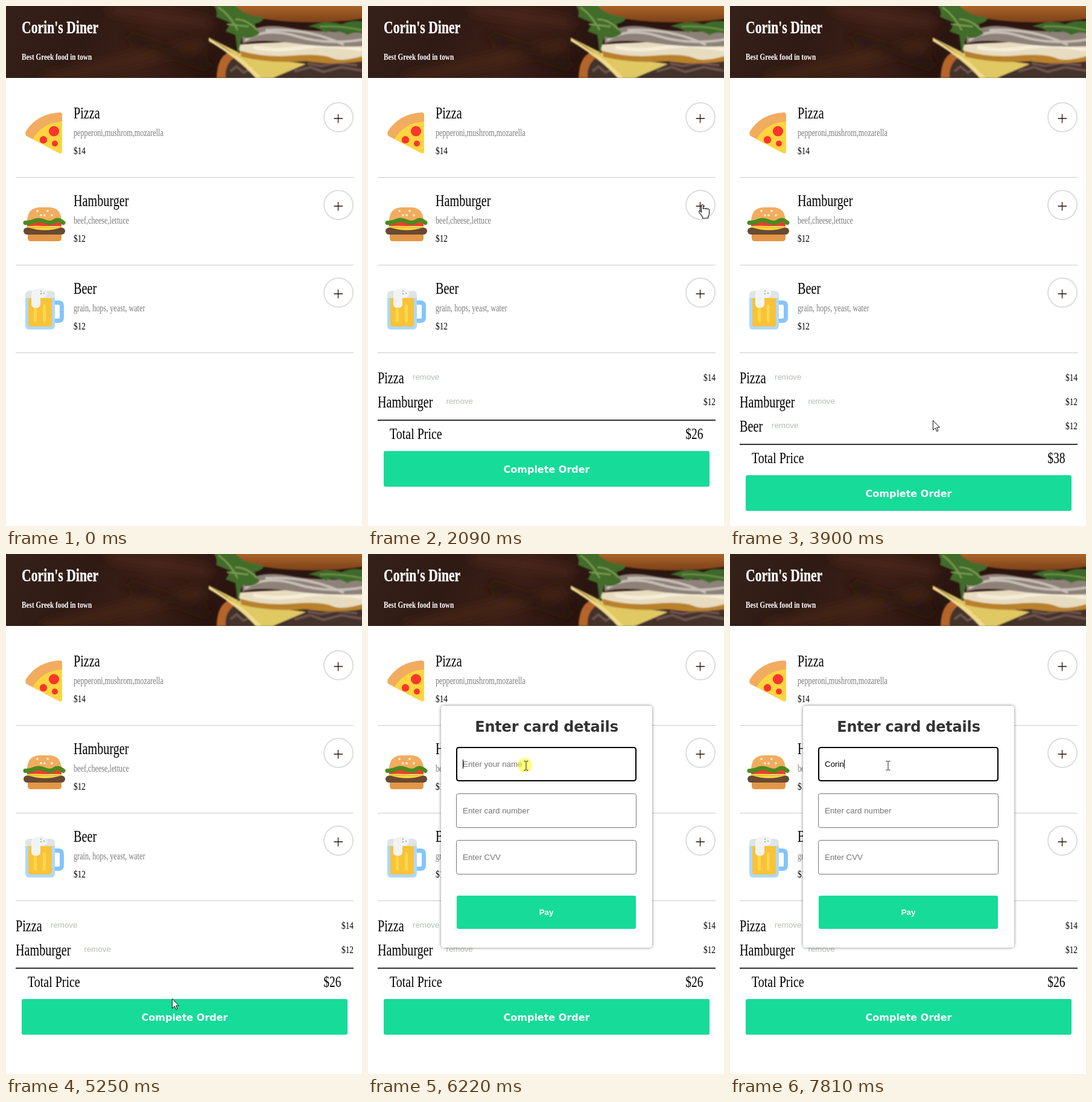
Recreate the animation shown at these times as an HTML page. Size 590 by 860 pixels, loop 8 s.

```html
<!DOCTYPE html>
<html lang="en">
<head>
<meta charset="utf-8">
<title>Diner menu</title>
<style>
html, body { margin: 0; width: 100%; height: 100%; overflow: hidden; background: #fff; }
svg { display: block; width: 590px; height: 860px; }
.menu { font-family: "Liberation Serif", "Noto Serif", serif; }
.ui { font: 13.333px "Liberation Sans", Arial, sans-serif; }
.bold { font: bold 16px "DejaVu Sans", Verdana, sans-serif; }
</style>
</head>
<body>
<svg viewBox="0 0 590 860" xmlns="http://www.w3.org/2000/svg">
  <defs>
    <clipPath id="banner"><rect width="590" height="119"/></clipPath>
    <linearGradient id="wood" x2="1" y2=".1">
      <stop offset="0" stop-color="#35211a"/><stop offset=".25" stop-color="#2f1a14"/>
      <stop offset=".45" stop-color="#3d2017"/><stop offset=".65" stop-color="#2a1510"/>
    </linearGradient>
    <linearGradient id="bun" x2="0" y2="1">
      <stop offset="0" stop-color="#b06a2c"/><stop offset="1" stop-color="#7b4019"/>
    </linearGradient>
    <filter id="soft"><feGaussianBlur stdDeviation=".8"/></filter>
    <filter id="blur" x="-20%" y="-50%" width="140%" height="200%"><feGaussianBlur stdDeviation="9"/></filter>
    <filter id="shadow" x="-10%" y="-10%" width="120%" height="120%">
      <feDropShadow dx="0" dy="0" stdDeviation="2.6" flood-color="#000" flood-opacity=".5"/>
    </filter>
  </defs>

  <g clip-path="url(#banner)">
    <rect width="590" height="119" fill="url(#wood)"/>
    <g filter="url(#blur)" fill="none" stroke-width="14">
      <path d="M60 122L330 62" stroke="#492618"/>
      <path d="M170 4L340 30" stroke="#4d281b"/>
      <path d="M200 50L340 100" stroke="#26120d"/>
    </g>
    <g filter="url(#soft)">
      <path d="M349 119Q350 84 370 76L420 119Z" fill="#b5652a"/>
      <path d="M364 119Q362 96 380 84Q480 74 600 84V122H364Z" fill="#43302c"/>
      <path d="M372 108l10-8 12 10 12-6M478 108l26-7 22 8 30-8 34 6M500 95l22 4 26-5 34 4" fill="none" stroke="#6d534c" stroke-width="4"/>
      <path d="M336 52Q356 62 396 82L497 96L442 119H416Q394 86 336 52Z" fill="#e0c864"/>
      <path d="M336 52Q372 76 396 92L424 119H414Q384 86 336 58Z" fill="#f0dc8c"/>
      <path d="M384 64Q470 56 600 62V88Q540 97 498 88Q452 96 390 84Z" fill="#e8dcc0"/>
      <path d="M388 74Q430 86 476 82T540 86T600 80V90Q540 99 498 91Q440 96 390 84Z" fill="#b9812c"/>
      <path d="M410 68Q450 76 490 69T590 72" fill="none" stroke="#f5edd8" stroke-width="6"/>
      <path d="M392 48Q420 26 470 36T600 40V66Q540 70 480 62T392 62Z" fill="#8d8178"/>
      <path d="M396 57Q430 34 482 50T600 54M430 40Q500 36 560 64" fill="none" stroke="#c9c0b8" stroke-width="4"/>
      <path d="M374-4Q384 14 424 21Q510 34 600 20V-4Z" fill="url(#bun)"/>
      <path d="M342-4Q352 8 348 18L372 28L364 42L380 48L384 80L392 50Q402 58 420 46L412 30Q432 24 424 18Q392 16 378-4Z" fill="#426c2c"/>
      <path d="M352 2Q372 16 384 40M366 30L402 34M380 22Q400 22 416 40" fill="none" stroke="#7d9f52" stroke-width="2.500"/>
      <path d="M500 34Q530 22 556 30Q572 22 600 26V48Q580 40 566 48Q544 36 530 44Q514 34 500 34Z" fill="#3e6a2a"/>
      <path d="M520 34Q550 32 590 40" fill="none" stroke="#6f9247" stroke-width="2.500"/>
    </g>
  </g>
  <g id="page"></g>

  <g transform="translate(32 176)">
    <path d="M1 31Q20 2 57 0Q61 0 61 4V64Q61 69 56 67L2 39Q-1 36 1 31Z" fill="#f1ac60"/>
    <path d="M12 44Q28 17 61 15V64Q61 69 56 67Z" fill="#fdd540"/>
    <g fill="#fb352e"><circle cx="47.5" cy="31" r="8.6"/><circle cx="30" cy="45.3" r="6.2"/><circle cx="49" cy="51.5" r="5"/></g>
  </g>
  <g transform="translate(29 333)">
    <path d="M6 22Q7 0 28 0H42Q62 0 63 22Z" fill="#f1ac60"/>
    <g fill="#ffeac8"><circle cx="23" cy="6" r="1.9"/><circle cx="40" cy="6" r="1.9"/><circle cx="29" cy="13" r="1.9"/><circle cx="35" cy="13" r="1.9"/><circle cx="47" cy="13" r="1.9"/></g>
    <path d="M6 24H63V31H6Z" fill="#f23c30"/>
    <path d="M6 31Q20 30 35 31T63 31V36H6Z" fill="#fdd540"/>
    <path d="M3 25.500Q11 26 18 22.500T35 23.500T51 23T66 25.500" fill="none" stroke="#4c8a1e" stroke-width="7" stroke-linecap="round"/>
    <path d="M7 43H63V51Q63 56 58 56H12Q7 56 7 51Z" fill="#e29746"/>
    <rect y="33.5" width="69" height="11.5" rx="5.7" fill="#684932"/>
    <path d="M8 33.5H62Q36 42 8 33.5Z" fill="#fdd540"/>
  </g>
  <g transform="translate(32 466)">
    <path d="M46 24.500H55Q60.500 24.500 60.500 30V49Q60.500 54.500 55 54.500H46" fill="none" stroke="#84c5fb" stroke-width="7"/>
    <rect y="6" width="49" height="63" rx="6" fill="#acd9fc"/>
    <path d="M0 17V12Q0 5 7 5H42Q49 5 49 12V17Z" fill="#dfe4e4"/>
    <path d="M5 17H44V61Q44 64 41 64H8Q5 64 5 61Z" fill="#f8c33a"/>
    <path d="M16.500 30V55M31.500 30V55" stroke="#fdd64b" stroke-width="5" stroke-linecap="round"/>
    <path d="M10 9Q13 1 20 2Q27-2 32 3Q38 5 36 11Q34 17 25 17V27Q25 33 17.500 33T10 27Z" fill="#f2f4f4"/>
    <g fill="#8e9698"><circle cx="26" cy="5.500" r="1"/><circle cx="31" cy="9" r="1"/><circle cx="26" cy="10" r="1"/></g>
  </g>

  <g id="cart"></g>
  <g id="foot"></g>
  <g id="modal">
    <rect x="121" y="251" width="350" height="400" rx="5" fill="#fff" filter="url(#shadow)"/>
    <text x="296" y="294" class="bold" style="font-size:24px;letter-spacing:-.2px" text-anchor="middle" fill="#333">Enter card details</text>
    <g id="fields"></g>
    <rect x="147" y="565" width="297" height="55" rx="3" fill="#16db99"/>
    <text x="295.500" y="597" class="ui" style="font-weight:bold" text-anchor="middle" fill="#fff">Pay</text>
    <rect id="focus" x="147" y="320" width="297" height="55" rx="4" fill="none" stroke="#000" stroke-width="2"/>
    <text id="typed" x="157" y="352" class="ui"></text>
    <rect id="caret" y="340" width="1" height="15"/>
  </g>
  <g id="pointer">
    <circle id="glow" r="12" fill="#ff0" fill-opacity=".5"/>
    <path id="arrow" d="M.5 .5V16.500L4.300 12.900L6.800 18.500L9 17.600L6.600 12H11.500Z" fill="#fff" stroke="#111"/>
    <path id="hand" d="M-1.500 13V2A1.500 1.500 0 0 1 1.500 2V8q0-1.500 1.700-1.500t1.800 1.700q0-1.300 1.600-1.300t1.800 1.600q.2-1 1.500-1t1.700 1.600V15q0 3-2 5v3H.5v-2L-5 13.500q-1.200-1.700 0-2.500t2 .3z" fill="#fff" stroke="#111" stroke-width="1.100"/>
    <path id="beam" transform="translate(2 1)" d="M-3.500-7.500H-1L0-6.500L1-7.500H3.500M0-7V7M-3.500 7.500H-1L0 6.500L1 7.500H3.500" fill="none" stroke="#222"/>
  </g>
</svg>
<script>
const LOOP = 8000, GREEN = '#16db99', NAME = 'Corin';
const $ = id => document.getElementById(id);
const show = (el, on) => el.setAttribute('display', on ? 'inline' : 'none');

// One condensed serif style for the whole menu
const serif = (text, x, y, size, extra = '') =>
  `<text class="menu" transform="translate(${x} ${y}) scale(.762 1)" font-size="${size}" ${extra}>${text}</text>`;
const END = 'text-anchor="end"';

const items = [
  { name: 'Pizza', info: 'pepperoni,mushrom,mozarella', price: 14, removeX: 74 },
  { name: 'Hamburger', info: 'beef,cheese,lettuce', price: 12, removeX: 129.5 },
  { name: 'Beer', info: 'grain, hops, yeast, water', price: 12, removeX: 69 }
];

$('page').innerHTML =
  serif(NAME + "'s Diner", 26, 45, 28.5, 'font-weight="bold" fill="#fff" stroke="#fff" stroke-width=".4"') +
  serif('Best Greek food in town', 26, 89, 14.8, 'font-weight="bold" fill="#fff"') +
  items.map((it, i) => `<g transform="translate(0 ${i * 145})">
    ${serif(it.name, 112, 186, 26.5)}
    ${serif(it.info, 112, 215, 16, 'fill="#7b7b7b"')}
    ${serif('$' + it.price, 112, 245, 17.5)}
    <circle cx="551" cy="184" r="24" fill="#fff" stroke="#ddd" stroke-width="2"/>
    <path d="M543.500 186H558M550.500 179V193.500" stroke="#2b100a" stroke-width="1.300"/>
    <path d="M16 283.500H576" stroke="#ccc"/></g>`).join('');

$('cart').innerHTML = items.map((it, i) => `<g transform="translate(0 ${i * 40})">
  ${serif(it.name, 16, 624, 26.5)}
  <text class="ui" x="${it.removeX}" y="618" fill="#b4bdb4">remove</text>
  ${serif('$' + it.price, 576, 620, 17.5, END)}</g>`).join('');

$('foot').innerHTML = `<path d="M16 645H576" stroke="#333" stroke-width="2"/>
  ${serif('Total Price', 36, 675.5, 26.2)}
  ${serif('', 555.5, 675.5, 25.5, END + ' id="total"')}
  <rect x="26" y="696" width="540" height="59" rx="3" fill="${GREEN}"/>
  <text x="296" y="731.500" class="bold" text-anchor="middle" fill="#fff">Complete Order</text>`;

$('fields').innerHTML = ['Enter your name', 'Enter card number', 'Enter CVV'].map((label, i) =>
  `<rect x="146.500" y="${319.5 + i * 77}" width="298" height="56" rx="3" fill="#fff" stroke="#767676"/>
   <text class="ui" x="157" y="${352 + i * 77}" fill="#757575">${label}</text>`).join('');
const hint = $('fields').querySelector('text');

// start, end, steps, ease, control x, y, target x, y
const ENTER = 320, FROM = [573, 827];
const moves = [
  [390, 860, 8, 'out', 500, 420, 554, 186],
  [1400, 1890, 8, 'both', 584, 258, 554, 328],
  [2290, 2690, 7, 'both', 576, 520, 552, 481],
  [3490, 3900, 7, 'in', 690, 640, 336, 685],
  [3970, 4320, 6, 'out', 190, 706, 99, 694],
  [5060, 5250, 4, 'in', 180, 712, 275, 735],
  [5320, 5390, 2, 'out', 315, 752, 340, 765],
  [5670, 5830, 3, 'out', 345, 680, 340, 589],
  [5900, 6120, 4, 'out', 310, 440, 260, 349]
];
const eases = {
  in: p => p ** 1.4,
  out: p => 1 - (1 - p) ** 1.6,
  both: p => p * p * (3 - 2 * p)
};
const clicks = [[1060, 1200], [1950, 2090], [2830, 2970], [4590, 4720], [5460, 5600], [6215, 6350]];
const counts = [[1200, 1], [2090, 2], [2970, 3], [4720, 2]];
const keys = [7280, 7420, 7560, 7650, 7800];
const MODAL = 5600, FOCUS = 6215;

function place(t) {
  let [x, y] = FROM;
  for (const [t0, t1, n, ease, cx, cy, tx, ty] of moves) {
    if (t < t0) break;
    const step = Math.floor((t - t0 + 1) / ((t1 - t0) / (n - 1))) + 1;
    const p = eases[ease](Math.min(1, step / n)), q = 1 - p;
    x = q * q * x + 2 * q * p * cx + p * p * tx;
    y = q * q * y + 2 * q * p * cy + p * p * ty;
  }
  return [x, y];
}

function shape(x, y, n, modal) {
  const within = (l, t, w, h) => x >= l && x <= l + w && y >= t && y <= t + h;
  if (modal && within(121, 251, 350, 400)) {
    if ([319, 396, 473].some(top => within(146, top, 299, 57))) return 'beam';
    return within(147, 565, 297, 55) ? 'hand' : 'arrow';
  }
  const over = items.some((it, i) =>
    Math.hypot(x - 551, y - 184 - i * 145) < 25 ||
    (i < n && within(it.removeX, 606 + i * 40, 45, 17)));
  return over || (n && within(26, 656 + n * 40, 540, 59)) ? 'hand' : 'arrow';
}

function draw(t) {
  const n = counts.reduce((c, [at, v]) => t >= at ? v : c, 0);
  [...$('cart').children].forEach((row, i) => show(row, i < n));
  show($('foot'), n > 0);
  $('foot').setAttribute('transform', `translate(0 ${(n - 1) * 40})`);
  $('total').textContent = '$' + items.slice(0, n).reduce((s, it) => s + it.price, 0);

  const modal = t >= MODAL, focus = t >= FOCUS;
  const text = NAME.slice(0, keys.filter(k => t >= k).length);
  show($('modal'), modal);
  show($('focus'), focus);
  show(hint, !text);
  $('typed').textContent = text;
  show($('caret'), focus && (t < 6750 || t >= 7280));
  $('caret').setAttribute('x', 157 + (text ? Math.round($('typed').getComputedTextLength()) : 0));

  const [x, y] = place(t), kind = shape(x, y, n, modal);
  show($('pointer'), t >= ENTER);
  $('pointer').setAttribute('transform', `translate(${Math.round(x)} ${Math.round(y)})`);
  ['arrow', 'hand', 'beam'].forEach(k => show($(k), k === kind));
  show($('glow'), clicks.some(([a, b]) => t >= a && t < b));
}

const start = performance.now();
function tick() {
  draw((performance.now() - start) % LOOP);
  requestAnimationFrame(tick);
}
tick();
</script>
</body>
</html>
```
